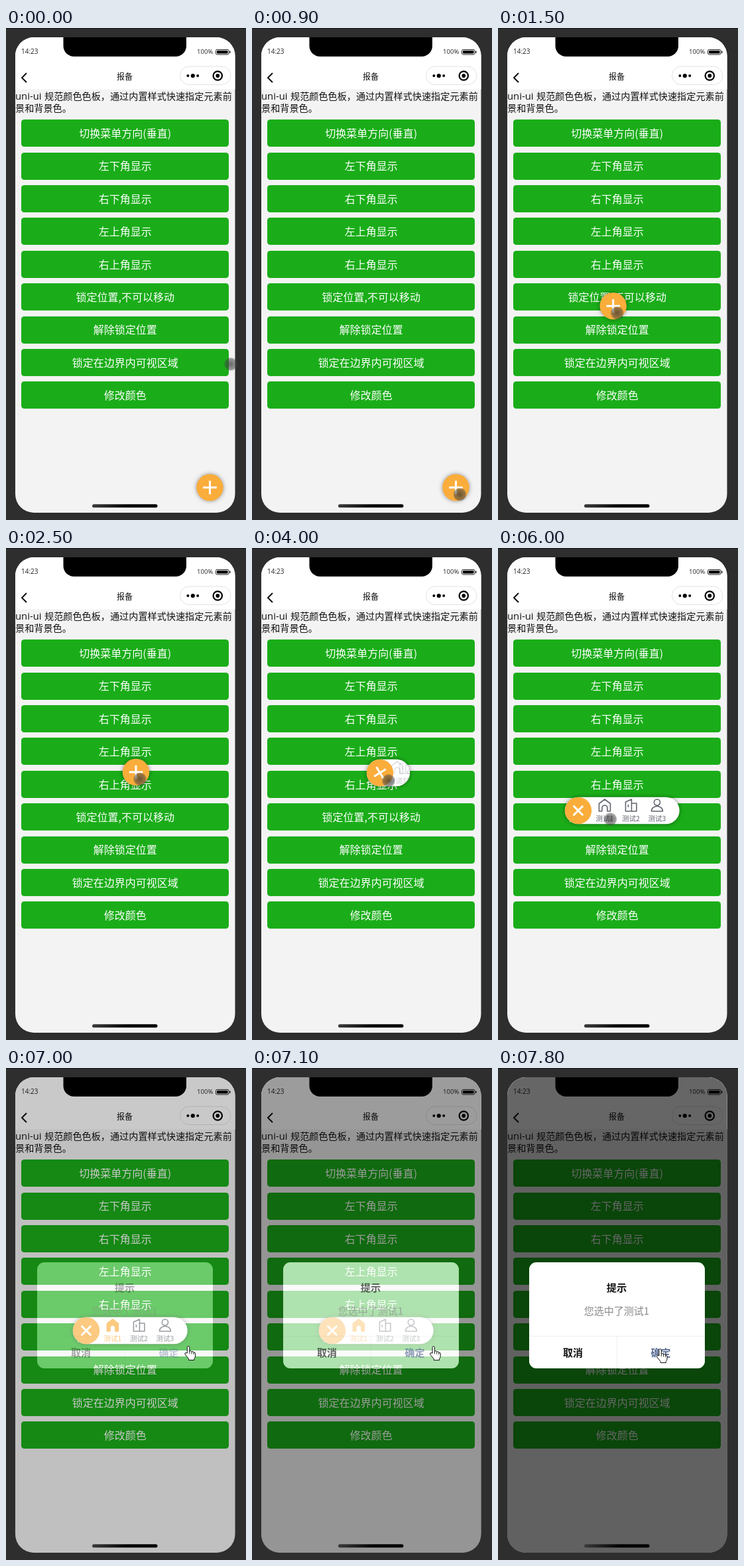
An HTML page with a canvas that plays this animation: 362x742 px, repeating every 8000 ms.

```html
<!DOCTYPE html>
<html lang="zh-CN">
<head>
<meta charset="utf-8">
<title>悬浮菜单</title>
<style>
html, body { margin: 0; width: 100%; height: 100%; overflow: hidden; background: #2e2e2e; }
canvas { display: block; width: 362px; height: 742px; }
</style>
</head>
<body>
<canvas id="stage"></canvas>
<script>
const W = 362, H = 742, LOOP = 8000, STEP = 100;
const GREEN = '#1aad19', ORANGE = '#faad3b', R = 20.2;
const PHONE = [14, 14, 331.5, 717, 28];
const CJK = '"Noto Sans CJK SC", "Noto Sans CJK", "Noto Sans SC", sans-serif';
const LATIN = '"Open Sans", "Noto Sans", sans-serif';
const LABELS = ['切换菜单方向(垂直)', '左下角显示', '右下角显示', '左上角显示', '右上角显示',
  '锁定位置,不可以移动', '解除锁定位置', '锁定在边界内可视区域', '修改颜色'];

const canvas = document.getElementById('stage');
const ctx = canvas.getContext('2d');
const ratio = window.devicePixelRatio || 1;
canvas.width = W * ratio;
canvas.height = H * ratio;

// ---- motion ----
const span = (t, from, to) => Math.min(1, Math.max(0, (t - from) / (to - from)));
const ease = (t, from, to) => {
  const k = span(t, from, to);
  return k * k * (3 - 2 * k);
};
const mix = (a, b, k) => a.map((v, i) => v + (b[i] - v) * k);

// Bezier of any degree by repeated mixing
function curve(k, ...pts) {
  while (pts.length > 1) pts = pts.slice(1).map((p, i) => mix(pts[i], p, k));
  return pts[0];
}

const REST = [307.5, 693], EDGE = [46, 265], CENTER = [196, 338], OPEN = [193, 339];

function fabAt(t) {
  if (t < 1800) return curve(span(t, 900, 1800), REST, [268, 505], EDGE);
  if (t < 2500) return curve(span(t, 1800, 2500), EDGE, [40, 616], [280, 616], CENTER);
  if (t < 4400) {
    const [x, y] = mix(CENTER, OPEN, ease(t, 2500, 3200));
    return [x, y - 13 * ease(t, 4000, 4200)];
  }
  const swing = Math.cos(3 * Math.PI * span(t, 4400, 5800));
  return [193 - 72 * ease(t, 4400, 5000), 361 - 35 * swing];
}

// Where the pointer holds the button
function gripAt(t) {
  let p = mix([6, 10.5], [13, 12], ease(t, 3300, 3600));
  p = mix(p, [48.5, 13], ease(t, 4200, 4400));
  p = mix(p, [-8, 3], ease(t, 6000, 6400));
  return mix(p, [41, 11], ease(t, 6400, 6800));
}

// ---- drawing helpers ----
function box(x, y, w, h, r, fill) {
  ctx.beginPath();
  ctx.roundRect(x, y, w, h, r);
  if (fill) {
    ctx.fillStyle = fill;
    ctx.fill();
  }
}

function outline(color, width) {
  ctx.strokeStyle = color;
  ctx.lineWidth = width;
  ctx.stroke();
}

function disc(x, y, r, fill) {
  ctx.beginPath();
  ctx.arc(x, y, r, 0, Math.PI * 2);
  if (fill) {
    ctx.fillStyle = fill;
    ctx.fill();
  }
}

function stroke(d, color, width) {
  ctx.strokeStyle = color;
  ctx.lineWidth = width;
  ctx.stroke(new Path2D(d));
}

// y is the visual middle of the glyphs
function text(s, x, y, size, color, align = 'center', weight = 400, family = CJK) {
  ctx.font = `${weight} ${size}px ${family}`;
  ctx.textAlign = align;
  ctx.fillStyle = color;
  ctx.fillText(s, x, y + size * .38);
}

function shadow(on) {
  ctx.shadowColor = on ? 'rgba(0,0,0,.42)' : 'transparent';
  ctx.shadowBlur = on ? 6 * ratio : 0;
}

// ---- scene ----
function header() {
  text('14:23', 23, 34.7, 10, '#222', 'left', 400, LATIN);
  text('100%', 288, 35.5, 9.6, '#222', 'left', 400, LATIN);
  box(316.5, 32.5, 19.5, 7.5, 2);
  outline('#222', 1);
  box(318, 34, 16.5, 4.5, 1, '#000');
  box(337, 34.5, 1.5, 3.5, .7, '#222');
  stroke('M31 68L24 75L31 82', '#111', 2);
  text('报备', 179, 73, 12, '#111');
  box(262.5, 58, 76.5, 27.5, 13.7, '#fff');
  outline('#e2e2e2', 1);
  for (const i of [-1, 0, 1]) disc(281.8 + i * 7.4, 72, i ? 2 : 3.1, '#000');
  disc(319.3, 72, 2.9, '#000');
  disc(319.3, 72, 6.7);
  outline('#000', 2.2);
}

function page() {
  ctx.fillStyle = '#2e2e2e';
  ctx.fillRect(0, 0, W, H);
  ctx.fillStyle = '#161616';
  ctx.fillRect(0, 0, W, 1);
  box(...PHONE, '#f3f3f3');
  box(14, 14, 331.5, 78.5, [28, 28, 0, 0], '#fff');
  header();
  text('uni-ui', 14, 102, 14.8, '#111', 'left', 400, LATIN);
  text('规范颜色色板，通过内置样式快速指定元素前', 58, 102.4, 14.15, '#111', 'left');
  text('景和背景色。', 14, 120.8, 14.15, '#111', 'left');
  LABELS.forEach((label, i) => {
    const y = 138.3 + i * 49.38;
    box(23, Math.round(y), 313, 41, 4.5, GREEN);
    text(label, 179.7, y + 20.6, 16, '#fff');
  });
}

function hardware() {
  box(86.5, 14, 185.5, 29, [0, 0, 16, 16], '#000');
  const shine = ctx.createLinearGradient(130, 0, 185, 0);
  shine.addColorStop(0, '#3a3a3a');
  shine.addColorStop(1, '#000');
  box(130, 718.3, 98.5, 5, 2.5, shine);
}

const icons = [
  'M-4 9H-8.5V-2.5L0 -9L8.5 -2.5V9H4V4A4 4 0 0 0 -4 4V9',
  'M-8 9V-5L1 -9V9ZM1 -3H8.5V9H1M-4 -1V3',
  'M4.6 -4.4A4.6 4.6 0 1 1 -4.6 -4.4A4.6 4.6 0 1 1 4.6 -4.4ZM-8.5 9C-8.5 -1 8.5 -1 8.5 9Z'
];

function item(i, x, y, active) {
  const color = active ? ORANGE : '#62666f';
  ctx.save();
  ctx.translate(x, y - 8);
  if (active) {
    ctx.fillStyle = color;
    ctx.fill(new Path2D(icons[i]));
  }
  stroke(icons[i], color, 1.6);
  ctx.restore();
  text('测试' + (i + 1), x, y + 12.4, 10.5, color);
}

function menu(t) {
  const [x, y] = fabAt(t);
  const open = span(t, 3900, 4130) ** 2;
  shadow(true);
  if (open > 0) {
    box(x - R, y - R, 2 * R + 132.5 * open, 2 * R, R, '#fff');
    shadow(false);
    ctx.save();
    ctx.clip();
    ctx.globalAlpha = open;
    const pitch = 39.5 * Math.max(open, .3);
    for (let i = 0; i < 3; i++) item(i, x + R + pitch * (i + .5), y, i === 0 && t >= 6800);
    ctx.restore();
  }
  disc(x, y, R, ORANGE);
  shadow(false);
  ctx.save();
  ctx.translate(x, y);
  ctx.rotate(.75 * Math.PI * ease(t, 3900, 4120));
  stroke('M-10.3 0H10.3M0 -10.3V10.3', '#fff', 3);
  ctx.restore();
}

function dialog(a) {
  if (a <= 0) return;
  const panel = [47, 293, 265, 160, 11];
  ctx.beginPath();
  ctx.roundRect(...PHONE);
  ctx.roundRect(...panel);
  ctx.fillStyle = `rgba(0,0,0,${.6 * a})`;
  ctx.fill('evenodd');
  ctx.globalAlpha = a;
  box(...panel, '#fff');
  ctx.fillStyle = 'rgba(0,0,0,.06)';
  ctx.fillRect(47, 404, 265, 1);
  ctx.fillRect(179, 405, 1, 48);
  text('提示', 179, 331.5, 15.2, '#111', 'center', 700);
  text('您选中了测试1', 179, 366, 15, '#888');
  text('取消', 113, 429.5, 15, '#111', 'center', 700);
  text('确定', 245.5, 429.5, 15, '#576b95', 'center', 700);
  ctx.globalAlpha = 1;
}

function touch(x, y) {
  const g = ctx.createRadialGradient(x, y, 0, x, y, 10.5);
  g.addColorStop(0, 'rgba(50,50,50,.72)');
  g.addColorStop(.8, 'rgba(65,65,65,.5)');
  g.addColorStop(1, 'rgba(80,80,80,0)');
  disc(x, y, 10.5, g);
}

function hand(x, y) {
  const d = 'M-1.6 10V1.4Q-1.6 -.4 0 -.4Q1.8 -.4 1.8 1.4V7Q4.5 5.6 5 7.8Q7.6 6.8 8.1 8.9Q10.6 8.4 10.6 10.8V14Q10.6 17 8.8 18.5V20.5H.6V18.5L-4.8 12Q-5.8 9.4 -3.6 9.4Z';
  ctx.save();
  ctx.translate(x, y);
  ctx.fillStyle = '#fff';
  ctx.fill(new Path2D(d));
  stroke(d, '#111', 1);
  stroke('M1.8 7V11M5 8V11.5M8.1 9V12', '#111', .9);
  ctx.restore();
}

function cursor(t) {
  const [x, y] = fabAt(t), [dx, dy] = gripAt(t);
  const held = [x + dx, y + dy];
  if (t < 6900) return touch(...mix([339, 507], held, ease(t, 0, 900)));
  const tip = mix(held, [275, 420], ease(t, 6800, 7000));
  hand(...mix(tip, [244.5, 424], ease(t, 7000, 7800)));
}

function draw(now) {
  const t = Math.floor((now % LOOP) / STEP) * STEP;
  ctx.setTransform(ratio, 0, 0, ratio, 0, 0);
  ctx.lineJoin = 'round';
  page();
  menu(t);
  dialog(ease(t, 6800, 7300));
  hardware();
  cursor(t);
}

const start = performance.now();
function frame() {
  draw(performance.now() - start);
  requestAnimationFrame(frame);
}
frame();
</script>
</body>
</html>
```
